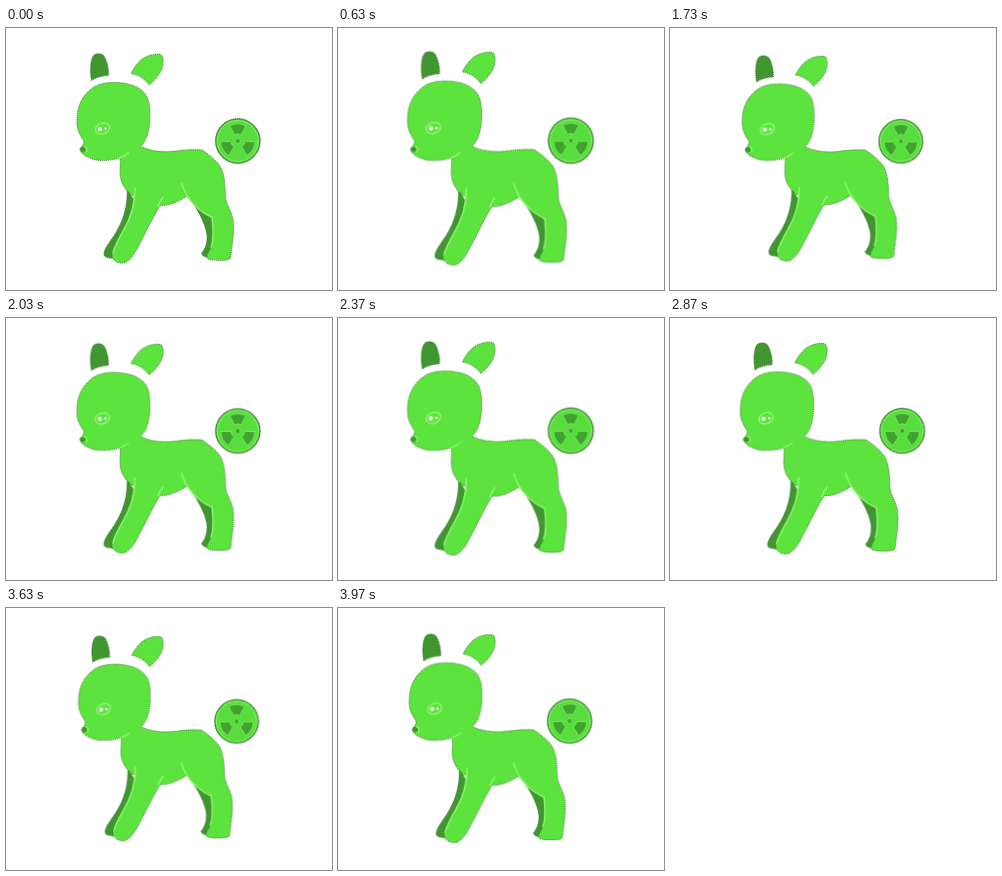
An HTML page that plays this animation: 326x262 px, repeating every 4010 ms.

```html
<!DOCTYPE html>
<html lang="en">
<head>
<meta charset="utf-8">
<title>Green fawn</title>
<style>
  html, body { margin: 0; width: 100%; height: 100%; overflow: hidden; background: #fff; }
  svg { display: block; width: 326px; height: 262px; }

  /* Half a breath lasts 1002.5 ms; starting mid-way puts scale 1 at load. */
  #fawn {
    transform-origin: 163px 131px;
    animation: breathe 1002.5ms cubic-bezier(.364, 0, .636, 1) -501.25ms infinite alternate;
  }
  @keyframes breathe {
    from { transform: scale(.9825, .9775); }
    to   { transform: scale(1.0175, 1.0225); }
  }

  .skin  { fill: #5ce33d; }
  .shade { fill: #40962f; }
  .edge  { stroke: #2c5c24; stroke-width: .8; stroke-dasharray: 1 1; }
  .line  { fill: none; stroke: #90f572; stroke-width: 1.5; stroke-linecap: round; }
</style>
</head>
<body>
<svg viewBox="0 0 326 262">
  <defs>
    <path id="blade" d="M-3.2 -6.2 L-8 -15.2 Q0 -19.2 8 -15.2 L3.2 -6.2 Q0 -8 -3.2 -6.2Z"/>
  </defs>
  <g id="fawn">
    <!-- far legs -->
    <g class="shade edge">
      <path d="M121 160 C122 178 117 193 109 206 C103 215 98 221 98 226 C98 229 102 230 107 230 L132 180Z"/>
      <path d="M188 177 C194 186 200 198 201 208 C201 216 199 221 195.500 225 C196 228 199 229 203 229 L212 195Z"/>
    </g>

    <!-- ears -->
    <path class="shade edge" d="M85.500 52.500 C84 44 84 34 87 28.500 C89 25 95 25 98 28 C101 33 103 41 102.500 47.500 C96 48 90 49.500 85.500 52.500Z"/>
    <path class="skin edge" d="M125 45.500 C129 38 134 31 141 28.500 C146 26.500 152 25.500 155.500 27 C158 31 157.500 38 155 43 C152 49 147 54 143 57 C139 51 133 47 125 45.500Z"/>

    <!-- head, body and near legs -->
    <path class="skin edge" d="M74 121.500 C75 118 79 117 77.500 112.500
      C73 106 70.500 100 71 92 C71 82 74 72 81 65 C88 57 97 54.500 108 54.500
      C123 54.500 136 59 141 69 C144 76 144 83 143.800 93 C143 103 141 113 134.500 118.500
      C145 123.500 158 124.500 170 123 C180 121.500 189 121.500 196 121.800
      C202 126 210 132 214 138 C219 147 219 158 219.500 170 C221 178 226 184 227 192
      C228.500 204 226 216 224.500 230 C223 233 207 232.500 202 231 C199.500 229 201 226 204 221
      C208 212 207 200 206 189 C196 184 187 177 181 168
      C173 173 165 177.500 154 177.500 C147 189 141 202 134 215
      C130 223 126 231 119 234.500 C113 236 107 233 106 228 C106 221 112 212 117 203
      C123 191 127 179 128 168 C119 163 114 154 114 144 L114.500 129.500
      C108 132 97 133.500 88 131.500 C80 129 75 126 74 121.500Z"/>

    <!-- contours -->
    <path class="line" d="M122.500 125 Q119 128 113.500 130"/>
    <path class="line" d="M129 160 C129 180 123 193 117 203 C112 212 107.500 220 107 225"/>
    <path class="line" d="M157 169 Q154 172 152 178"/>
    <path class="line" d="M175.500 155 C180 171 193 184 206 189 C207.500 202 208 211 205 219"/>

    <!-- face -->
    <g transform="rotate(-20 96.500 100.500)">
      <ellipse class="line" cx="96.500" cy="100.500" rx="7.300" ry="5.300"/>
    </g>
    <g fill="#fff">
      <circle cx="94" cy="101" r="2.100"/>
      <circle cx="99.500" cy="100.500" r="1.200"/>
    </g>
    <path class="shade" d="M74 121.500 Q75 118.500 78 118.500 Q81.500 120.500 80.500 122.500 Q77 125 75.500 124Z"/>
    <path class="line" stroke-width="1" d="M78.500 118.500 Q82 121 80 123.500"/>

    <!-- tail disc -->
    <g transform="translate(231.700 113)">
      <circle r="22" fill="#59dd3e" stroke="#3b8a2d"/>
      <circle class="edge" r="22.400" fill="none"/>
      <circle class="line" r="20.500" style="stroke-width:.8"/>
      <g fill="#40a32f" stroke="#79ee5c" stroke-width=".8">
        <use href="#blade"/>
        <use href="#blade" transform="rotate(120)"/>
        <use href="#blade" transform="rotate(240)"/>
        <circle r="2.500"/>
      </g>
    </g>
  </g>
</svg>
</body>
</html>
```
